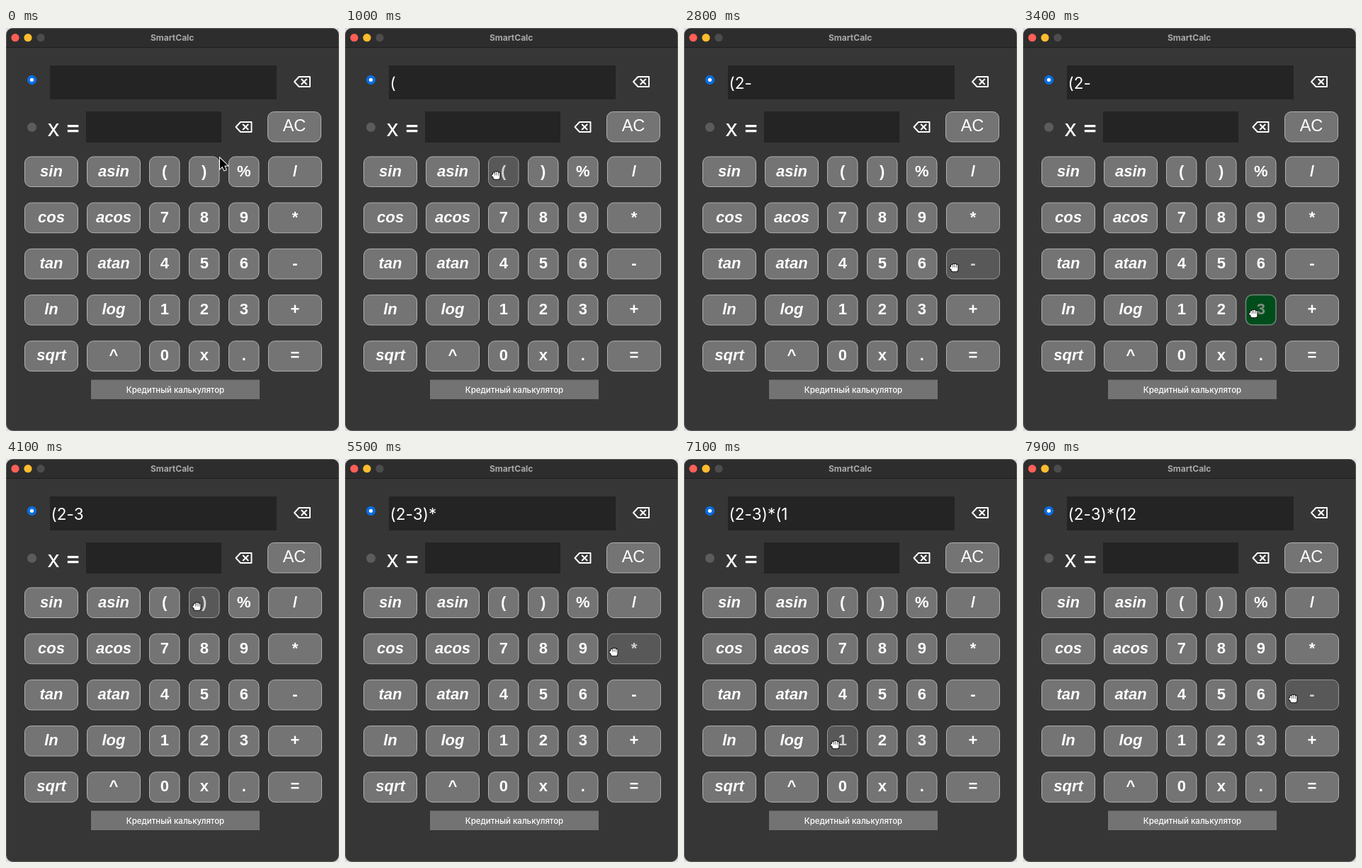
Animation of 470x570 px, one loop 8 s. Source, as an HTML page with a canvas:

```html
<!DOCTYPE html>
<html lang="ru">
<head>
<meta charset="utf-8">
<title>SmartCalc</title>
<style>
html, body { margin: 0; width: 100%; height: 100%; overflow: hidden; background: #ddd; }
canvas { display: block; }
</style>
</head>
<body>
<canvas id="stage" width="470" height="570"></canvas>
<script>
const ctx = document.getElementById('stage').getContext('2d');
const LOOP = 8000, STEP = 100, HOLD = 300;
const SANS = '"Liberation Sans", Arial, sans-serif';
const UI = 'Inter, "Open Sans", sans-serif';

// Keypad: two wide columns, three narrow ones, one wide
const LABELS = [
  'sin asin ( ) % /',
  'cos acos 7 8 9 *',
  'tan atan 4 5 6 -',
  'ln log 1 2 3 +',
  'sqrt ^ 0 x . ='
];

const buttons = LABELS.flatMap((row, r) => row.split(' ').map((label, c) => ({
  label,
  x: c < 2 ? 26 + 88 * c : 90 + 56 * c,
  y: 181.5 + 65.2 * r,
  w: c > 1 && c < 5 ? 43.5 : 76,
  h: 43.5,
  font: (/[a-z]{2}/.test(label) ? 'italic ' : '') + 'bold 22px ' + SANS
})));
buttons.push({ label: 'AC', x: 369, y: 118, w: 76, h: 43.5, font: '23.5px ' + SANS });

// Keys visited and the time each is pressed
const visits = [
  ['(', 900], ['6', 1600, 'hover'], ['2', 2100], ['-', 2600], ['3', 3400], [')', 4200],
  ['*', 5100], ['(', 6200], ['1', 6800], ['2', 7300], ['-', LOOP]
].map(([key, time, hover]) => {
  const b = buttons.find(b => b.label === key);
  return { key, time, click: !hover, x: b.x + 11, y: b.y + b.h / 2 + 5 };
});
const clicks = visits.filter(v => v.click);

const easeInOut = k => k < 0.5 ? 4 * k ** 3 : 1 - 4 * (1 - k) ** 3;

// The pointer reaches a key one step before pressing it and rests there for HOLD
function pointerAt(t) {
  let from = { x: 302, y: 184, time: -HOLD };
  for (const to of visits) {
    const leave = from.time + HOLD, arrive = to.time - STEP;
    if (t < arrive) {
      const k = easeInOut(Math.max(0, (t - leave) / (arrive - leave)));
      return [from.x + (to.x - from.x) * k, from.y + (to.y - from.y) * k];
    }
    from = to;
  }
  return [from.x, from.y];
}

function rect(x, y, w, h, color) {
  ctx.fillStyle = color;
  ctx.fillRect(x, y, w, h);
}

function roundBox(x, y, w, h, fill, stroke, line = 1) {
  ctx.fillStyle = fill;
  ctx.strokeStyle = stroke;
  ctx.lineWidth = line;
  ctx.beginPath();
  ctx.roundRect(x + 0.5, y + 0.5, w - 1, h - 1, 9);
  ctx.fill();
  ctx.stroke();
}

function dot(x, y, r, color) {
  ctx.fillStyle = color;
  ctx.beginPath();
  ctx.arc(x, y, r, 0, Math.PI * 2);
  ctx.fill();
}

function text(str, x, y, font, color = '#fff', align = 'center') {
  ctx.font = font;
  ctx.fillStyle = color;
  ctx.textAlign = align;
  ctx.fillText(str, x, y);
}

function poly(points, close = true) {
  ctx.beginPath();
  points.forEach(([x, y]) => ctx.lineTo(x, y));
  if (close) ctx.closePath();
}

function drawWindow() {
  rect(0, 0, 470, 570, '#ddd');
  roundBox(0, 0, 470, 570, '#363636', '#5a5a5a');
  ctx.save();
  ctx.clip();
  rect(1, 1, 468, 26, '#2d2d2d');
  rect(0, 27, 470, 1, '#1f1f1f');
  ctx.restore();
  ['#ff5f57', '#febc2e', '#4c4c4c'].forEach((color, i) => dot(13 + 18 * i, 13.7, 5.6, color));
  text('SmartCalc', 234.7, 17.5, 'bold 12px ' + UI, '#a9a9a9');
}

function drawBackspace(x, y) {
  ctx.strokeStyle = '#fff';
  ctx.lineWidth = 1.9;
  ctx.lineJoin = 'round';
  poly([[x, y + 8], [x + 6.5, y + 1], [x + 22, y + 1], [x + 22, y + 15], [x + 6.5, y + 15]]);
  ctx.stroke();
  for (const s of [-4, 4]) {
    poly([[x + 9.7, y + 8 - s], [x + 17.7, y + 8 + s]], false);
    ctx.stroke();
  }
}

function drawFields(value) {
  rect(62, 53, 320, 48, '#242424');
  rect(113, 118, 191, 44, '#242424');
  dot(36.5, 73.3, 6.6, '#0a6ee0');
  dot(36.5, 73.3, 2.6, '#fff');
  dot(36.5, 140.3, 6.5, '#5c5c5c');
  text('x', 67, 153, '33px ' + UI);
  text('=', 94.7, 152, '500 34px ' + UI);
  drawBackspace(407, 68);
  drawBackspace(324.5, 132);
  let x = 63.5;
  for (const ch of value) {
    text(ch, x, 86, '22.5px ' + UI, '#fff', 'left');
    x += ctx.measureText(ch).width;
  }
}

function drawButton(b, state) {
  const [fill, edge, color] = {
    normal: ['#747474', '#b2b2b2', '#fff'],
    hover: ['#585858', '#9a9a9a', '#cfcfcf'],
    pressed: ['#004d1c', '#708878', '#7f907f']
  }[state];
  roundBox(b.x, b.y, b.w, b.h, fill, edge, state === 'pressed' ? 1.5 : 1);
  text(b.label, b.x + b.w / 2, b.y + 28, b.font, color);
}

function drawArrow(x, y) {
  poly([[0, 0], [0, 15], [3.4, 11.8], [6, 17.5], [8.6, 16.4], [6.2, 10.8], [10.8, 10.6]]
    .map(([dx, dy]) => [x + dx, y + dy]));
  ctx.lineWidth = 2;
  ctx.lineJoin = 'miter';
  ctx.strokeStyle = '#fff';
  ctx.stroke();
  ctx.fillStyle = '#000';
  ctx.fill();
}

function drawHand(x, y) {
  const shape = (grow, color) => {
    const part = (dx, dy, w, h, r) =>
      ctx.roundRect(x + dx - grow, y + dy - grow, w + 2 * grow, h + 2 * grow, r + grow);
    ctx.beginPath();
    for (let i = 0; i < 4; i++) part(-3.8 + i * 2.4, i % 3 ? -5 : -3.8, 2, 7, 1);
    part(-3.6, -1, 9, 6.5, 2);
    part(-5.6, -1, 3.4, 3, 1.2);
    ctx.fillStyle = color;
    ctx.fill();
  };
  shape(1, '#111');
  shape(0, '#fff');
  for (let i = 0; i < 3; i++) rect(x - 1.7 + i * 2.4, y - 3.4, 0.6, 4, '#444');
}

function draw(t) {
  const [mx, my] = pointerAt(t);
  const over = buttons.find(b => mx > b.x && mx < b.x + b.w && my > b.y && my < b.y + b.h);
  const value = clicks.filter(c => t >= c.time + STEP).map(c => c.key).join('');
  const down = clicks.some(c => t >= c.time && t < c.time + STEP);

  drawWindow();
  drawFields(value);
  for (const b of buttons) drawButton(b, b !== over ? 'normal' : down ? 'pressed' : 'hover');
  rect(120, 497.5, 238, 27.5, '#737373');
  text('Кредитный калькулятор', 239, 516.3, '500 11.5px ' + UI);
  (over ? drawHand : drawArrow)(mx, my);
}

const start = performance.now();
function tick() {
  const t = (performance.now() - start) % LOOP;
  draw(Math.floor(t / STEP) * STEP);
  requestAnimationFrame(tick);
}
tick();
</script>
</body>
</html>
```
